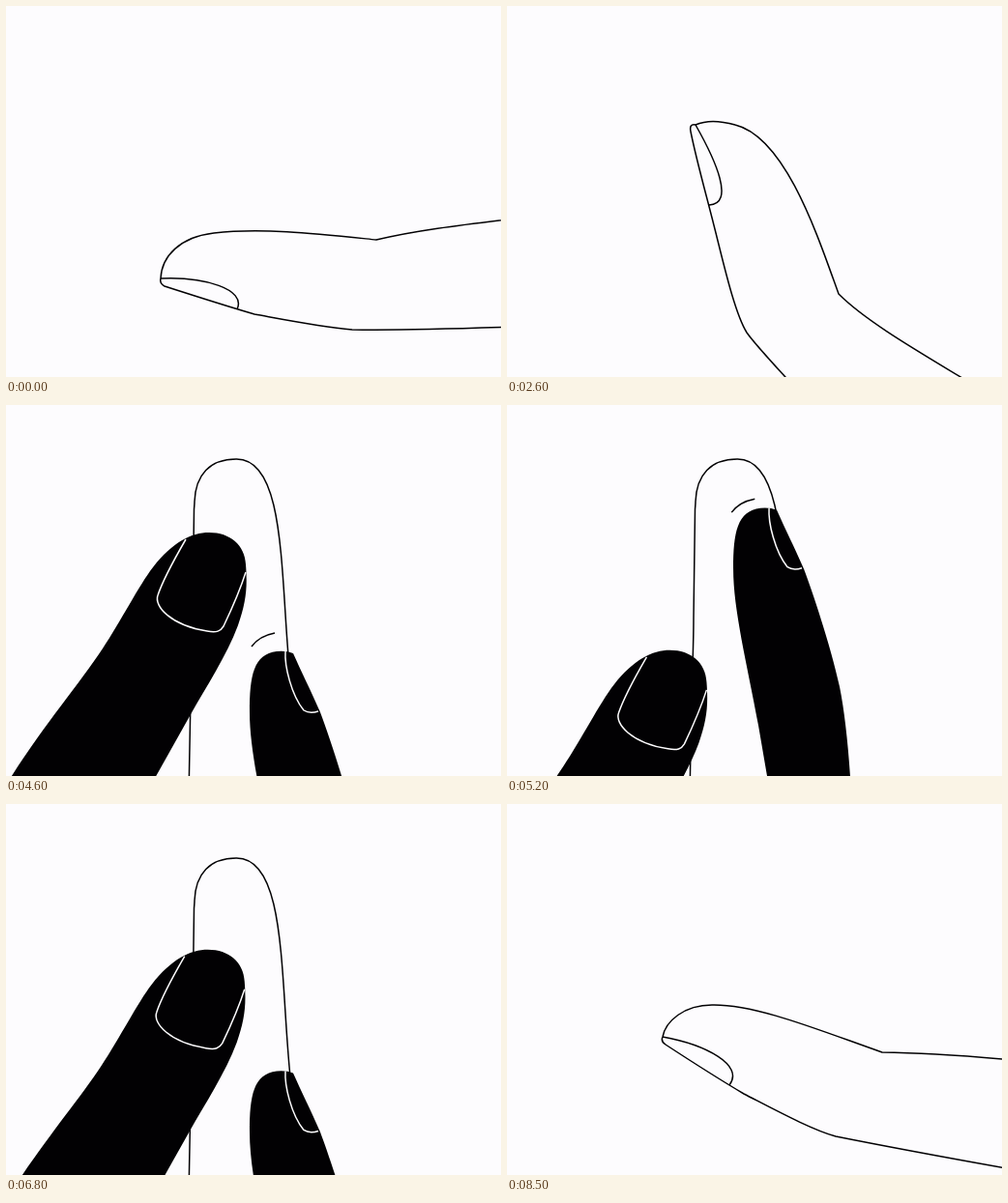
Recreate the animation shown at these times as an HTML page with a canvas. Size 512 by 384 pixels, loop 8.6 s.

```html
<!DOCTYPE html>
<html lang="en">
<head>
<meta charset="utf-8">
<title>Fingertip care</title>
<style>
  html, body { margin: 0; width: 100%; height: 100%; overflow: hidden; background: #fdfcfe; }
  canvas { display: block; width: 512px; height: 384px; }
</style>
</head>
<body>
<canvas id="stage" width="512" height="384"></canvas>
<script>
const ctx = document.getElementById('stage').getContext('2d');
const LOOP = 8600, STEP = 100;
const PAPER = '#fdfcfe', INK = '#020103';

// Finger poses: tip, then cubic segments for back, underside and nail.
const flat = [
  160,282, 161,259, 180,239, 215,235, 265,229, 325,236, 383,242, 420,233, 466,227, 530,219.5,
  159,286, 160,288, 164,290, 195,300, 226,310, 257,319, 290,325, 325,332, 358,335, 410,336, 470,334, 530,332,
  205,280, 249,293, 239,314
];
const raised = [
  161,241, 164,225, 183,208, 212,208, 258,207, 325,235, 388,257, 430,257.5, 480,261, 530,265.5,
  159,245, 161,247, 164,249, 190,266, 218,284, 245,300, 280,318, 315,337, 340,344, 390,354, 460,367, 530,379.5,
  205,249, 246,270, 230,291
];
const bent = [
  195,123, 206,118, 222,119, 236,123, 288,136, 321,237, 343,298, 373,328, 430,360, 484,393,
  190,122, 189,125, 190,130, 196,160, 206,195, 214,227, 223,262, 235,317, 248,338, 262,358, 300,396, 345,446,
  216,160, 236,205, 209,206
];
const upright = [
  195,100, 196,72, 211,56, 238,56, 292,55, 283,187, 295,292, 300,320, 308,370, 320,465,
  195,103, 194.7,105, 194.5,108, 194,150, 193.5,190, 193,220, 193,250, 191.5,280, 191,300, 190,340, 189,400, 188,460,
  194.6,130, 193.5,170, 193,200
];
const poses = [flat, raised, bent, upright];
const stops = [0, 0.125, 0.5, 1];

const leftHand = new Path2D('M4 387C40 330 75 290 100 252C118 225 138 186 152 168C172 142 192 132 210 132' +
  'C232 132 247 145 248 165C250 190 248 205 240 228C228 260 208 290 190 322L153 388Z');
const leftNail = new Path2D('M186 139C175 158 162 182 157 197C153 208 170 228 208 234C218 236 222 234 225 229C235 208 242 192 248 173');
const rightHand = new Path2D('M290 550L278 480C266 415 252 360 252 318C252 280 256 258 280 255Q290 254 297 257' +
  'C305 275 315 295 325 318C334 342 352 395 362 440Q370 480 374 550Z');
const rightNail = new Path2D('M289 255C288 270 295 300 308 316Q314 320 323 317');
const rightCrease = new Path2D('M254 250Q262 239 278 236');
const leftCrease = new Path2D('M212 110Q232 112 243 126');
const cap = new Path2D('M225 -70Q205 -35 195 0C187 28 183 55 184.5 85.5L275 84.5C274 50 282 22 300 -1Q320 -30 345 -50Z');
const drop = new Path2D('M4 -9C0 -4 -4 1 -4 5C-4 10 2 10 3 5C3 0 3 -4 4 -9Z');

const ramp = (t, a, b) => Math.min(1, Math.max(0, (t - a) / (b - a)));
const ease = (t, a, b) => { const x = ramp(t, a, b); return x * x * (3 - 2 * x); };

// Cubic blend through the poses with uneven spacing.
function blend(k, u) {
  let i = 0;
  while (i < 2 && u > stops[i + 1]) i++;
  const slope = j => (poses[j + 1][k] - poses[j][k]) / (stops[j + 1] - stops[j]);
  const tangent = j => {
    if (j === 0) return slope(0);
    if (j === 3) return slope(2);
    const before = stops[j] - stops[j - 1], after = stops[j + 1] - stops[j];
    return (slope(j - 1) * after + slope(j) * before) / (before + after);
  };
  const h = stops[i + 1] - stops[i], x = (u - stops[i]) / h;
  const s = x * x * (3 - 2 * x), y = 1 - x;
  return poses[i][k] * (1 - s) + poses[i + 1][k] * s + h * x * y * (y * tangent(i) - x * tangent(i + 1));
}

function drawFinger(u) {
  const p = flat.map((_, k) => blend(k, u));
  const curve = (from, to) => {
    ctx.moveTo(p[0], p[1]);
    for (let k = 2 + from * 6; k < 2 + to * 6; k += 6) ctx.bezierCurveTo(...p.slice(k, k + 6));
  };
  ctx.beginPath();
  curve(0, 3);
  curve(3, 7);
  if (u < 1) curve(7, 8);
  ctx.stroke();
}

function at(x, y, draw) {
  ctx.save();
  ctx.translate(x, y);
  draw();
  ctx.restore();
}

function drawBrush(sway) {
  ctx.fill(cap);
  const s = sway;
  ctx.beginPath();
  ctx.moveTo(229, 84);
  ctx.bezierCurveTo(228, 130, 223 + s * 0.5, 190, 217 + s, 234);
  ctx.bezierCurveTo(213 + s, 246, 216 + s, 262, 223 + s, 263);
  ctx.bezierCurveTo(230 + s, 263, 228 + s, 251, 235 + s, 252);
  ctx.bezierCurveTo(243 + s, 257, 249 + s, 250, 249.5 + s, 238);
  ctx.bezierCurveTo(249 + s, 231, 244 + s, 234, 244 + s, 220);
  ctx.bezierCurveTo(247 + s * 0.6, 180, 252, 130, 255, 84);
  ctx.fill();
}

function drawDrops(t) {
  if (t >= 1400 && t < 1800) {
    const f = (t - 1500) / 200;
    at(207 - 3 * f, 263 + 5 * f, () => ctx.fill(drop));
  }
  if (t >= 1800 && t < 2100) {
    const f = (t - 1800) / 200;
    at(287 + 7 * f, 259 + 8 * f, () => { ctx.scale(-1, 1); ctx.fill(drop); });
  }
}

function drawHand(shape, nail, x, y) {
  at(x, y, () => {
    ctx.fill(shape);
    ctx.strokeStyle = PAPER;
    ctx.stroke(nail);
  });
}

function drawHands(t) {
  const away = 1 - ease(t, 3000, 4300) + ease(t, 6600, 7800);
  const swap = ease(t, 4600, 5300) - ease(t, 5600, 6300);
  drawHand(leftHand, leftNail, -44 * swap - 17 * away, 129 * swap + 252 * away);
  drawHand(rightHand, rightNail, -19 * swap, -157 * swap + 290 * away);
  if (t >= 4600 && t < 6300) at(-23 * swap, -147 * swap, () => ctx.stroke(rightCrease));
  if ((t >= 4200 && t < 4600) || (t >= 6300 && t < 6700)) ctx.stroke(leftCrease);
}

function render(t) {
  ctx.fillStyle = PAPER;
  ctx.fillRect(0, 0, 512, 384);
  ctx.fillStyle = ctx.strokeStyle = INK;
  ctx.lineWidth = 1.5;
  ctx.lineJoin = 'round';

  drawFinger(ramp(t, 2200, 3000) - ramp(t, 7800, 8600));
  if (t >= 300 && t < 2500) {
    const lift = 1 - ease(t, 200, 1100) + ease(t, 2000, 2500);
    const sway = 10 - 10 * ease(t, 1100, 1500) + 34 * ease(t, 1500, 1900);
    at(0, -268 * lift, () => drawBrush(sway));
    drawDrops(t);
  }
  if (t >= 3000 && t < 7800) drawHands(t);
}

function tick() {
  render(Math.floor(performance.now() % LOOP / STEP) * STEP);
  requestAnimationFrame(tick);
}
tick();
</script>
</body>
</html>
```
